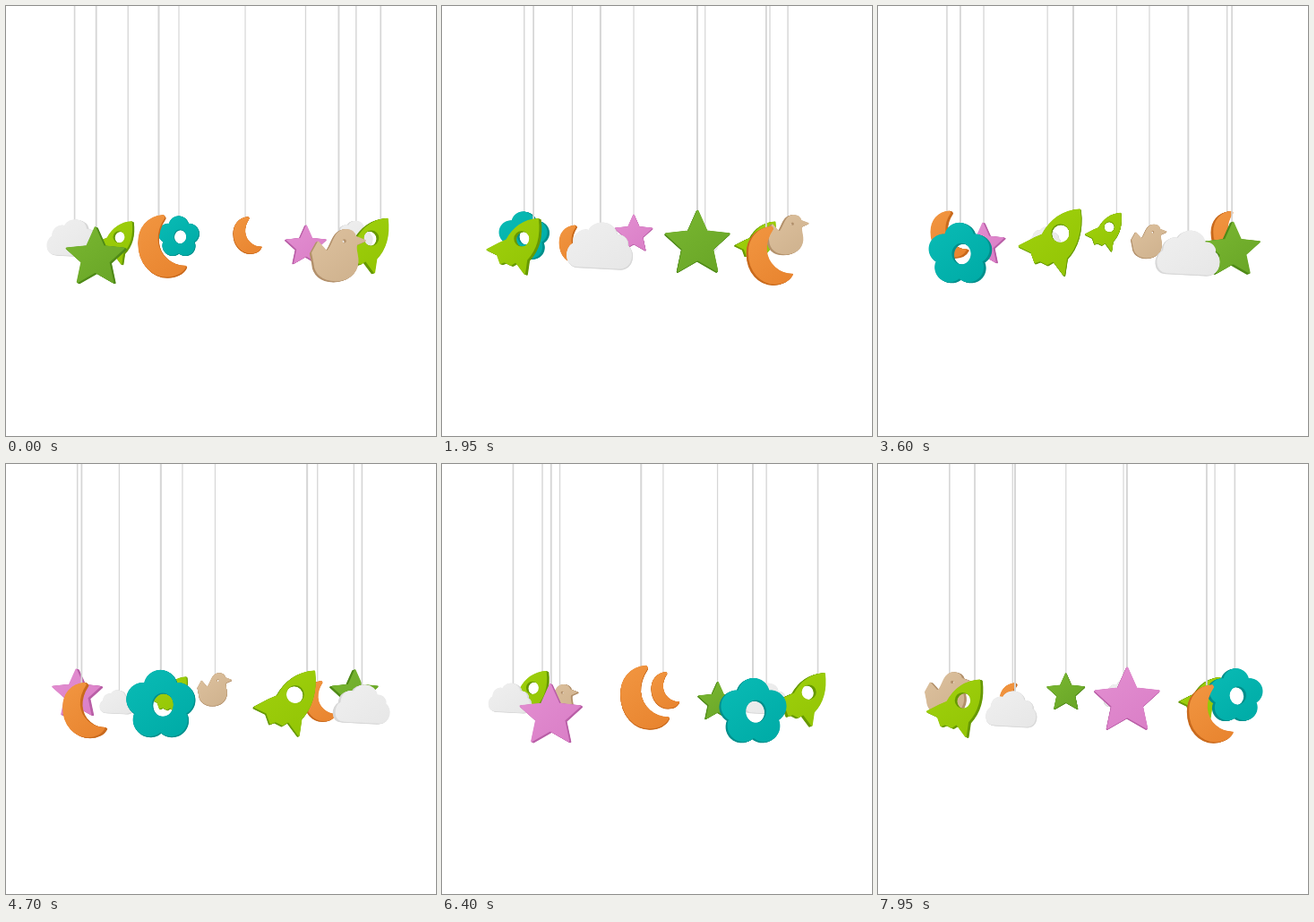
Write an HTML page with a canvas that moves like this. It is 480 px wide and 480 px high and loops after 8 s.

```html
<!DOCTYPE html>
<html lang="en">
<head>
<meta charset="utf-8">
<title>Nursery mobile</title>
<style>
  html, body { margin: 0; width: 100%; height: 100%; overflow: hidden; background: #fff; }
  canvas { display: block; width: 100vw; height: 100vh; }
</style>
</head>
<body>
<canvas id="stage" width="480" height="480"></canvas>
<script>
const LOOP = 8000, STEP = 50;
const DEG = Math.PI / 180;
const SPEED = 0.03;                      // degrees per ms
const CENTER_X = 237.5, HORIZON = 241, RADIUS = 155.5, DEPTH = 0.27;
const DROP = 21.9, BOB = 8.4, BOB_PHASE = 1.5;

const canvas = document.getElementById('stage');
const ctx = canvas.getContext('2d');
const ratio = Math.max(1, window.devicePixelRatio || 1);
canvas.width = canvas.height = 480 * ratio;

function polar(count, cy, radius) {
  const path = new Path2D();
  for (let i = 0; i < count; i++) {
    const a = i / count * 360;
    const r = radius(a);
    path.lineTo(r * Math.sin(a * DEG), cy - r * Math.cos(a * DEG));
  }
  path.closePath();
  return path;
}

function addHole(path, x, y, rx, ry) {
  path.moveTo(x + rx, y);
  path.ellipse(x, y, rx, ry, 0, 0, 2 * Math.PI);
  return path;
}

function petalRadius(angle) {
  const p = 13, q = 15.2;
  const d = ((angle + 36) % 72 - 36) * DEG;
  return q * Math.cos(d) + Math.sqrt(p * p - (q * Math.sin(d)) ** 2);
}

const star = polar(10, 2.6, a => a % 72 ? 12.8 : 27.2);
const flower = addHole(polar(180, 1, petalRadius), 2, 0.8, 9.6, 10.6);
const moon = new Path2D(`M1-24.6C-12-23.5-19-14-19-2C-19 15-8 25.5 4 25.5
  C11 25.5 17 22.5 19.3 17.5C8 17.5-3 9-4-4C-4.5-13-1-19 1.8-23.2Z`);
const rocket = addHole(new Path2D(`M24.5-26.5C10-25.5 0-17-6-6L-13-3L-25 3.2L-15 8L-12 16.5
  L-8 15L-2 18L3 15L11.5 26.5L13.5 13C22 4 26.5-10 24.5-26.5Z`), 8.6, -7.4, 8.2, 8.4);
const bird = addHole(new Path2D(`M-17-12L-9-3C-3-6-3-23.5 9-23.5C14-23.5 17-21 18-17L27-13.5
  L19-10C17-6 20.5 0 20 7C19 18 10 24-1 24C-13 24-20 17-20.5 8L-22.5-2Z`), 7.5, -13, 2.6, 2.6);
const cloud = new Path2D(`M-18 18.7C-29 18.7-29 4-22 0C-22-10-14-13-9.5-11.5
  C-6-21 11-22 14-9C21-10 24-4 23-1C30 3 29 18.7 18 18.7Z`);

const ORANGE = ['#f19540', '#e8842f', '#c96a1d'];
const LIME = ['#9fd00c', '#93c505', '#679900'];
const WHITE = ['#efefef', '#e7e7e7', '#d8d8d8'];

// start: angle from the front; hang: string offset from the middle; top: where the string ends
const toys = [
  { shape: star,   start: -45.5,  hang: 0,  top: -22, colors: ['#78b530', '#69a627', '#4f8a18'] },
  { shape: moon,   start: -17.5,  hang: -3, top: -21, colors: ORANGE },
  { shape: bird,   start: 42,     hang: 3,  top: -18, colors: ['#dcc09d', '#cfb28e', '#b3916c'], size: 0.95 },
  { shape: rocket, start: 65.5,   hang: 19, top: -22, colors: LIME },
  { shape: cloud,  start: 96,     hang: 3,  top: -10, colors: WHITE, size: 0.76, tilt: 3 },
  { shape: star,   start: 132.5,  hang: 0,  top: -22, colors: ['#e28dd0', '#da7fc7', '#b95fa7'] },
  { shape: moon,   start: 165,    hang: -3, top: -21, colors: ORANGE },
  { shape: flower, start: -159,   hang: 0,  top: -22, colors: ['#08b9b3', '#00aca7', '#008f8c'] },
  { shape: rocket, start: -120.4, hang: 19, top: -22, colors: LIME },
  { shape: cloud,  start: -75.5,  hang: 0.5, top: -15, colors: WHITE, size: 0.97, tilt: 3 }
];

function place(toy, time) {
  const angle = toy.start + SPEED * time;
  const side = Math.sin(angle * DEG);
  const scale = 1 / (1 - DEPTH * Math.cos(angle * DEG));
  const drop = DROP - BOB * Math.cos(4 * (angle - BOB_PHASE) * DEG);
  return { toy, side, scale, x: CENTER_X + RADIUS * side * scale, y: HORIZON + drop * scale };
}

function paint(shape, color) {
  ctx.fillStyle = ctx.strokeStyle = color;
  ctx.fill(shape, 'evenodd');
  ctx.stroke(shape);
}

function drawToy({ toy, side, scale, x, y }) {
  const { shape, hang, top, size = 1, tilt = 0, colors: [light, face, edge] } = toy;
  ctx.save();
  ctx.translate(x, y);
  ctx.scale(scale, scale);

  ctx.fillStyle = '#d6d6d6';
  ctx.fillRect(hang - 0.75, -y / scale, 1.5, y / scale + top);

  ctx.scale(size, size);
  ctx.rotate(tilt * DEG);
  ctx.lineWidth = 1.6;
  ctx.lineJoin = 'round';
  const dx = -2.8 * side, dy = 0.9;
  ctx.translate(dx / 2, dy / 2);
  const layers = 5;
  for (let i = 0; i < layers; i++) {
    paint(shape, edge);
    ctx.translate(-dx / layers, -dy / layers);
  }
  const shade = ctx.createLinearGradient(-18, -22, 18, 24);
  shade.addColorStop(0, light);
  shade.addColorStop(1, face);
  paint(shape, shade);
  ctx.restore();
}

function draw(now) {
  const time = Math.floor(now % LOOP / STEP) * STEP;
  ctx.setTransform(ratio, 0, 0, ratio, 0, 0);
  ctx.fillStyle = '#fff';
  ctx.fillRect(0, 0, 480, 480);
  toys.map(toy => place(toy, time))
    .sort((a, b) => a.scale - b.scale)
    .forEach(drawToy);
}

let begin;
function tick(now) {
  begin ??= now;
  draw(Math.max(0, now - begin));
  requestAnimationFrame(tick);
}
draw(0);
requestAnimationFrame(tick);
</script>
</body>
</html>
```
